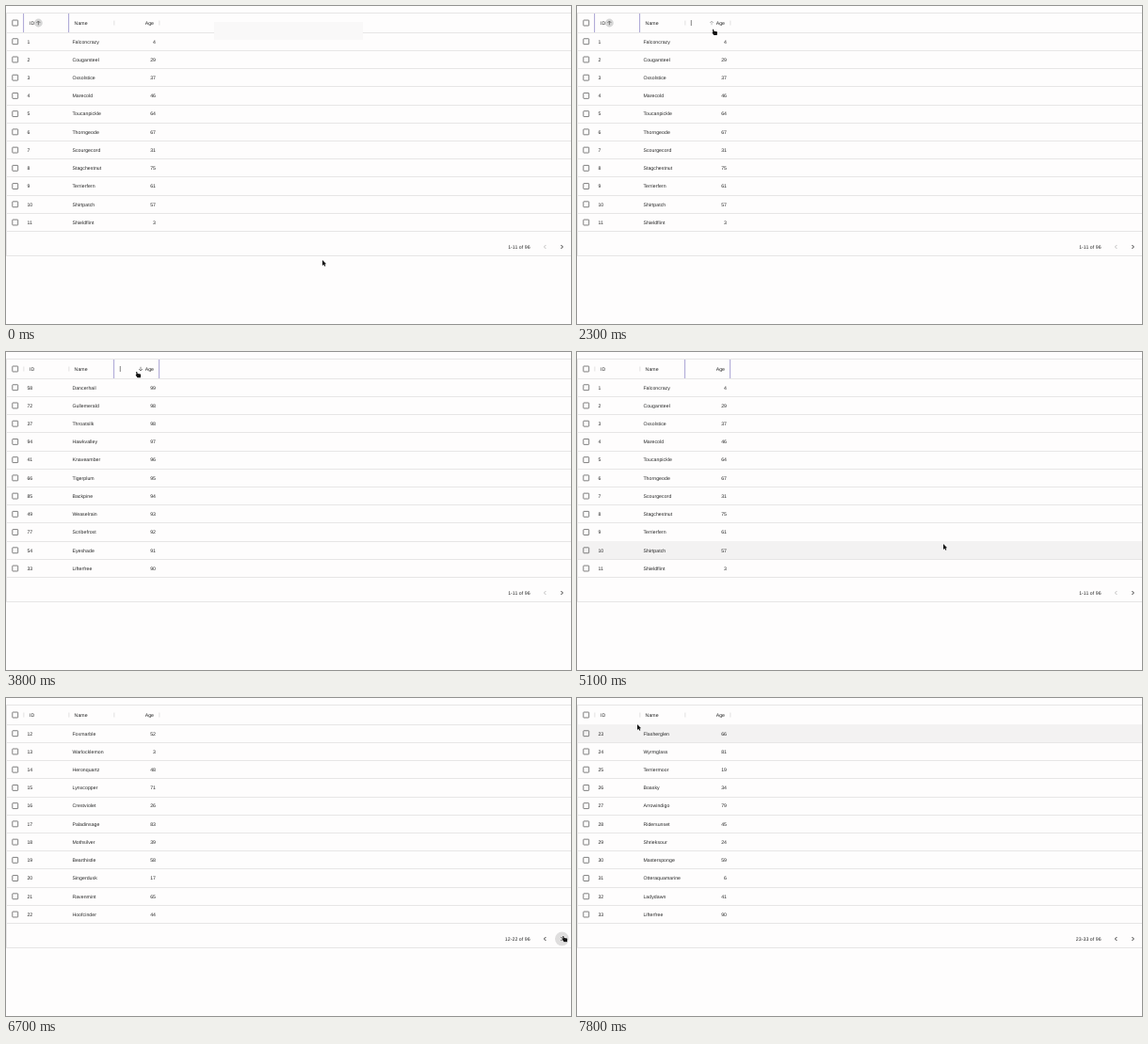
These frames come from a looping animation (600 by 338 pixels, 8000 ms). An HTML page with a canvas:

```html
<!DOCTYPE html>
<html lang="en">
<head>
<meta charset="utf-8">
<title>Sortable data grid</title>
<style>
html, body { margin: 0; width: 100%; height: 100%; overflow: hidden; background: #fefdfd; }
canvas { display: block; width: 600px; height: 338px; }
</style>
</head>
<body>
<canvas id="stage"></canvas>
<script>
const LOOP = 8000, STEP = 100;
const ROW_TOP = 28.1, ROW_H = 19.23, ROWS = 11;
const INK = '#252525', LINE = '#e7e6e6', FOCUS = '#aaa4d4';
const NEXT = { x: 590.4, y: 256 };
const PREV = { x: 572.4, y: 256 };

const canvas = document.getElementById('stage');
const dpr = window.devicePixelRatio || 1;
canvas.width = 600 * dpr;
canvas.height = 338 * dpr;
const ctx = canvas.getContext('2d');

// "Name age" pairs with consecutive ids
const page = (first, text) => text.split(', ').map((entry, i) => {
  const [name, age] = entry.split(' ');
  return [String(first + i), name, age];
});
// "id Name age" triples
const sorted = text => text.split(', ').map(entry => entry.split(' '));

const page1 = page(1, 'Falconcrazy 4, Cougarsteel 29, Oxsolstice 37, Marecold 46, Toucanpickle 64, ' +
  'Thorngeode 67, Scourgecord 31, Stagchestnut 75, Terrierfern 61, Shirtpatch 57, Shieldflint 3');
const page2 = page(12, 'Foxmarble 52, Warlocklemon 3, Heronquartz 48, Lynxcopper 71, Crestviolet 26, ' +
  'Paladinsage 83, Mothsilver 39, Bearthistle 58, Singerdusk 17, Ravenmint 65, Hoofcinder 44');
const page3 = page(23, 'Flasherglen 66, Wyrmglass 81, Terriermoor 19, Boasky 34, Arrowindigo 79, ' +
  'Ridersunset 45, Shrieksour 24, Mastersponge 59, Otteraquamarine 6, Ladydawn 41, Lifterfree 90');
const ascending = sorted('51 Sargentbutter 0, 82 Iguanaglacier 0, 90 Thumbtar 0, 62 Storkwater 1, ' +
  '11 Shieldflint 3, 13 Warlocklemon 3, 1 Falconcrazy 4, 75 Birdglass 5, 31 Otteraquamarine 6, ' +
  '46 Kittennoon 6, 80 Followerthread 6');
const descending = sorted('58 Dancerhail 99, 72 Gullemerald 98, 37 Throatsilk 98, 94 Hawkvalley 97, ' +
  '41 Knaveamber 96, 66 Tigerplum 95, 85 Backpine 94, 49 Weaselrain 93, 77 Scribefrost 92, ' +
  '54 Eyeshade 91, 33 Lifterfree 90');

const views = [[0, page1], [2800, ascending], [3800, descending], [4600, page1], [6500, page2], [7100, page3]];
const path = [
  [0, 336, 270], [1000, 336, 270], [1400, 292, 143], [1500, 292, 143], [1700, 194, 57],
  [1900, 194, 57], [2400, 138, 21], [4800, 138, 21], [5100, 389, 204], [5200, 389, 204],
  [5500, 533, 252], [5600, 533, 252], [6000, 591, 253], [7100, 591, 253], [7200, 580, 254],
  [7800, 64, 28], [LOOP, 64, 28]
];

const ease = p => p * p * (3 - 2 * p);

function pointer(t) {
  const i = Math.max(1, path.findIndex(key => key[0] >= t));
  const [t0, x0, y0] = path[i - 1], [t1, x1, y1] = path[i];
  const p = ease((t - t0) / (t1 - t0));
  return { x: x0 + (x1 - x0) * p, y: y0 + (y1 - y0) * p };
}

function rect(x, y, w, h, color) {
  ctx.fillStyle = color;
  ctx.fillRect(x, y, w, h);
}

function circle(x, y, r, color) {
  ctx.fillStyle = color;
  ctx.beginPath();
  ctx.arc(x, y, r, 0, 7);
  ctx.fill();
}

function text(str, x, y, align = 'left') {
  ctx.fillStyle = INK;
  ctx.textAlign = align;
  ctx.fillText(str, x, y + 1.85);
}

function trace(points, x, y) {
  ctx.beginPath();
  points.forEach(([dx, dy]) => ctx.lineTo(x + dx, y + dy));
}

function stroke(points, x, y, color, width) {
  trace(points, x, y);
  ctx.strokeStyle = color;
  ctx.lineWidth = width;
  ctx.stroke();
}

function checkbox(y) {
  ctx.strokeStyle = '#686868';
  ctx.lineWidth = 0.85;
  ctx.beginPath();
  ctx.roundRect(6.8, y - 2.95, 5.9, 5.9, 0.5);
  ctx.stroke();
}

function sortArrow(x, down, color) {
  const s = down ? -1 : 1;
  stroke([[0, 2.2 * s], [0, -2 * s]], x, 18, color, 0.8);
  stroke([[-2, 0], [0, -2 * s], [2, 0]], x, 18, color, 0.8);
}

function chevron({ x, y }, dir, color) {
  stroke([[-dir, -2], [dir, 0], [-dir, 2]], x, y, color, 0.95);
}

function header(t, overAge) {
  checkbox(18);
  text('ID', 25, 18);
  text('Name', 72.6, 18);
  text('Age', 157, 18, 'right');

  const focused = t < 2700 ? [19, 67] : t < 6200 ? [115, 163] : [];
  for (const x of [19, 67, 115, 163]) {
    if (focused.includes(x)) rect(x - 0.9, 8, 1, 20, FOCUS);
    else rect(x - 0.5, 15.5, 0.8, 5, '#d9d9d9');
  }

  if (t < 2800) {
    circle(34.4, 18, 4.4, '#d6d6d6');
    sortArrow(34.4, false, '#666');
  }
  const ageSorted = t >= 2800 && t < 4600;
  if (ageSorted || overAge) {
    sortArrow(143, t >= 3800 && ageSorted, ageSorted ? '#707070' : '#b4b4b4');
  }
  if (overAge) {
    for (const dy of [-2, 0, 2]) circle(121.3, 18 + dy, 0.65, '#505050');
  }
}

function body(rows, hoverRow) {
  rows.forEach(([id, name, age], i) => {
    const top = ROW_TOP + i * ROW_H, mid = top + ROW_H / 2;
    if (i === hoverRow) rect(1, Math.round(top), 599, 19, '#f3f2f2');
    rect(0, Math.floor(top + ROW_H), 600, 1, LINE);
    checkbox(mid);
    text(id, 22.4, mid);
    text(name, 70.4, mid);
    text(age, 159, mid, 'right');
  });
}

function ripple(t, overNext) {
  if (overNext) circle(NEXT.x, NEXT.y, 7.4, 'rgba(0,0,0,.045)');
  if (t >= 6200 && t < 6900) {
    const p = (t - 6200) / 600;
    circle(NEXT.x, NEXT.y, 4 + 3.4 * Math.min(1, p * 3), `rgba(0,0,0,${0.05 + 0.1 * Math.max(0, p - 0.5)})`);
  } else if (t >= 6900 && t < 7500) {
    circle(NEXT.x, NEXT.y, 6, `rgba(0,0,0,${t < 7000 ? 0.1 : 0.23 * Math.min(1, (7500 - t) / 300)})`);
  }
}

function footer(t, rows, overNext) {
  const first = t < 6500 ? 1 : +rows[0][0];
  text(`${first}-${first + ROWS - 1} of 96`, 556.6, 256, 'right');
  ripple(t, overNext);
  chevron(PREV, -1, first === 1 ? '#bdbdbd' : '#333');
  chevron(NEXT, 1, '#333');
}

const arrowShape = [[0, 0], [0, 5.9], [1.4, 4.7], [2.4, 6.8], [3.4, 6.3], [2.5, 4.3], [4.2, 4.2]];
const handShape = [[0.2, 0], [1.2, 0], [1.7, 1.9], [4.8, 2.4], [5.2, 3.2], [4.9, 6.2], [1.5, 6.2], [-0.4, 3.6], [0.4, 3.1]];

function cursor({ x, y }, hand) {
  trace(hand ? handShape : arrowShape, x, y);
  ctx.closePath();
  ctx.lineJoin = 'round';
  ctx.strokeStyle = '#fff';
  ctx.lineWidth = 0.9;
  ctx.stroke();
  ctx.fillStyle = '#111';
  ctx.fill();
  ctx.lineJoin = 'miter';
}

function draw(t) {
  const mouse = pointer(t);
  const rows = views.filter(([start]) => start <= t).pop()[1];
  const overAge = mouse.y < 28 && mouse.x > 115 && mouse.x < 163;
  const overNext = Math.hypot(mouse.x - NEXT.x, mouse.y - NEXT.y) < 7.4;
  const hand = overAge || overNext || t === 7200;

  ctx.setTransform(dpr, 0, 0, dpr, 0, 0);
  ctx.font = '5.18px "Liberation Sans", Arial, sans-serif';
  ctx.letterSpacing = '0.055px';
  ctx.textRendering = 'geometricPrecision';

  rect(0, 0, 600, 338, '#fefdfd');
  rect(0, 7, 600, 1, LINE);
  rect(0, 28, 600, 1, LINE);
  rect(0, 265, 600, 1, LINE);
  rect(0, 8, 1, 257, LINE);
  if (t < 700) rect(221, 17, 158, 19, '#f9f8f8');

  header(t, overAge);
  body(rows, Math.floor((mouse.y + 0.8 - ROW_TOP) / ROW_H));
  footer(t, rows, overNext);
  cursor(mouse, hand);
}

function frame() {
  const t = performance.now() % LOOP;
  draw(Math.floor(t / STEP) * STEP);
  requestAnimationFrame(frame);
}
frame();
</script>
</body>
</html>
```
